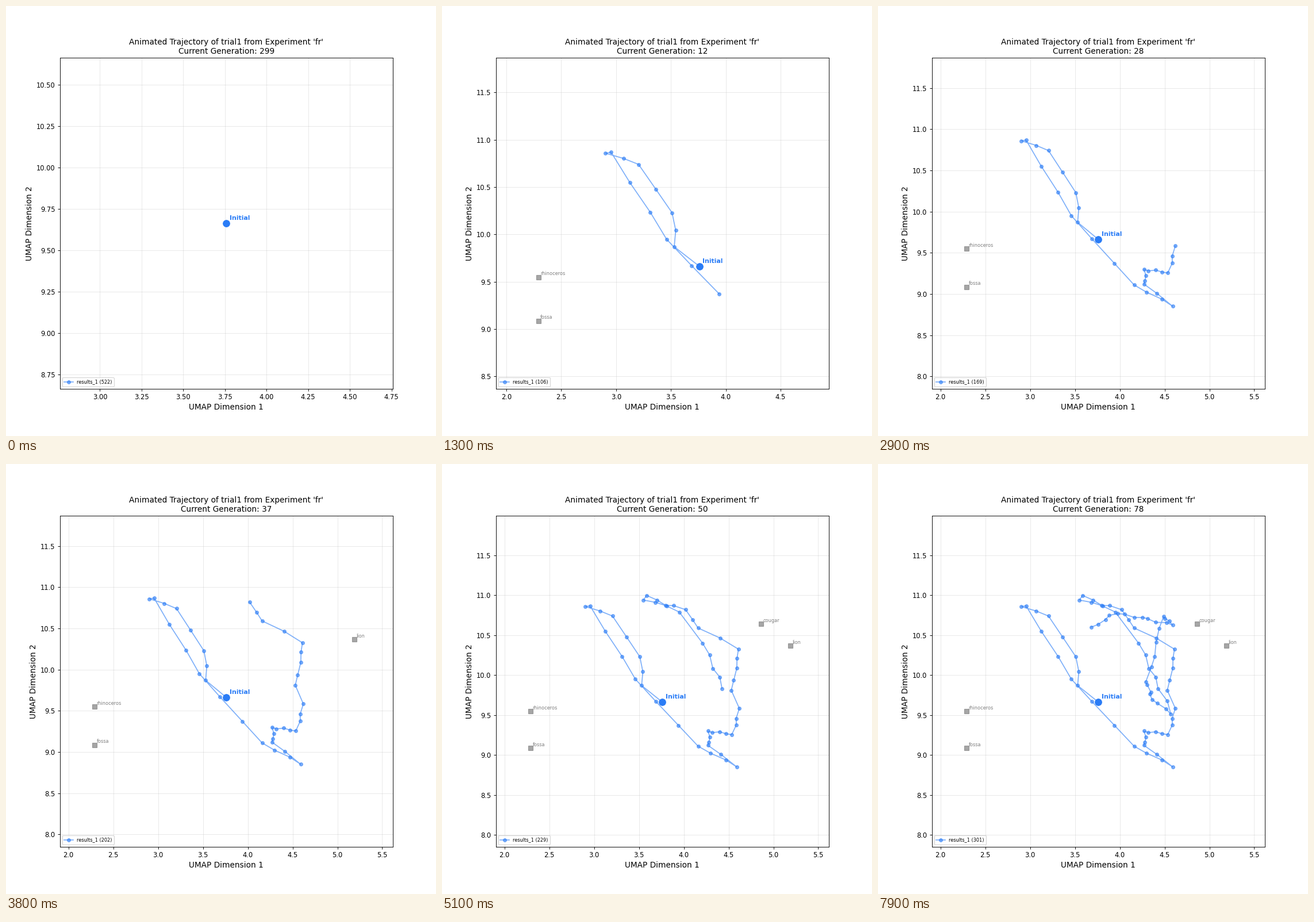
Recreate the animation shown at these times as a matplotlib script. Size 748 px wide and 748 px high, loop 8 s.

```python
import numpy as np
import matplotlib.pyplot as plt
from matplotlib.animation import FuncAnimation

FRAMES, INTERVAL = 80, 100
BLUE = "#2a7cf6"
HEADING = 11.85

# Turning points of the walk: step, x, y
TURNS = [
    (0, 3.759, 9.664), (1, 3.53, 9.87), (3, 3.51, 10.23), (5, 3.205, 10.74),
    (7, 2.903, 10.858), (8, 2.955, 10.868), (11, 3.46, 9.95), (14, 4.16, 9.11),
    (17, 4.59, 8.851), (19, 4.27, 9.12), (22, 4.27, 9.30), (26, 4.535, 9.255),
    (29, 4.62, 9.583), (30, 4.53, 9.81), (34, 4.61, 10.325), (36, 4.16, 10.59),
    (38, 4.02, 10.82), (42, 3.55, 10.94), (43, 3.586, 10.998), (46, 3.95, 10.79),
    (47, 4.21, 10.40), (53, 4.57, 9.51), (56, 4.36, 9.695), (60, 4.29, 9.916),
    (65, 4.49, 10.736), (68, 4.59, 10.625), (75, 3.98, 10.77), (79, 3.68, 10.60)]

# name, x, y, step at which it shows up
LANDMARKS = [("rhinoceros", 2.292, 9.548, 1), ("fossa", 2.292, 9.087, 12),
             ("lion", 5.189, 10.366, 33), ("cougar", 4.865, 10.640, 48)]


def make_walk():
    """Straight legs between the turning points, with a slight wobble on the way."""
    steps, kx, ky = np.array(TURNS).T
    t = np.arange(FRAMES)
    wobble = np.random.default_rng(4).uniform(-0.025, 0.025, (2, FRAMES))
    wobble[:, steps.astype(int)] = 0
    return np.array([np.interp(t, steps, kx), np.interp(t, steps, ky)]) + wobble


def result_count(gen):
    return round(np.interp(gen, [0, 5, 18, 37, 50, 67, 78, 299],
                           [55, 76, 132, 202, 229, 266, 301, 522]))


def note(text, x, y, offset, **style):
    return ax.annotate(text, (x, y), xytext=(offset, offset),
                       textcoords="offset points", **style)


xs, ys = make_walk()

fig, ax = plt.subplots(figsize=(9, 9), dpi=83.1112)
ax.set_xlabel("UMAP Dimension 1", fontsize=HEADING)
ax.set_ylabel("UMAP Dimension 2", fontsize=HEADING)
ax.grid(True, alpha=0.3)

path, = ax.plot([], [], "o-", color=BLUE, alpha=0.6, lw=1.5, ms=5, label="results_1")
ax.plot(xs[0], ys[0], "o", color=BLUE, ms=10, zorder=3)
note("Initial", xs[0], ys[0], 5, fontsize=9.5, fontweight="bold", color=BLUE)

marks = []
for name, x, y, start in LANDMARKS:
    square, = ax.plot(x, y, "s", color="gray", alpha=0.7, ms=7)
    label = note(name, x, y, 3, fontsize=7, color="gray")
    marks.append((start, square, label))

legend = ax.legend(handles=[path], loc="lower left", fontsize=7)


def update(i):
    gen = (i - 1) % 300
    px, py = xs[:i + 1], ys[:i + 1]
    path.set_data(px, py)
    ax.set_xlim(px.min() - 1, px.max() + 1)
    ax.set_ylim(py.min() - 1, py.max() + 1)
    for start, square, label in marks:
        square.set_visible(i >= start)
        label.set_visible(i >= start)
    legend.get_texts()[0].set_text(f"results_1 ({result_count(gen)})")
    ax.set_title("Animated Trajectory of trial1 from Experiment 'fr'\n"
                 f"Current Generation: {gen}", fontsize=HEADING)


anim = FuncAnimation(fig, update, frames=FRAMES, interval=INTERVAL,
                     repeat=True, repeat_delay=0)
plt.show()
```
